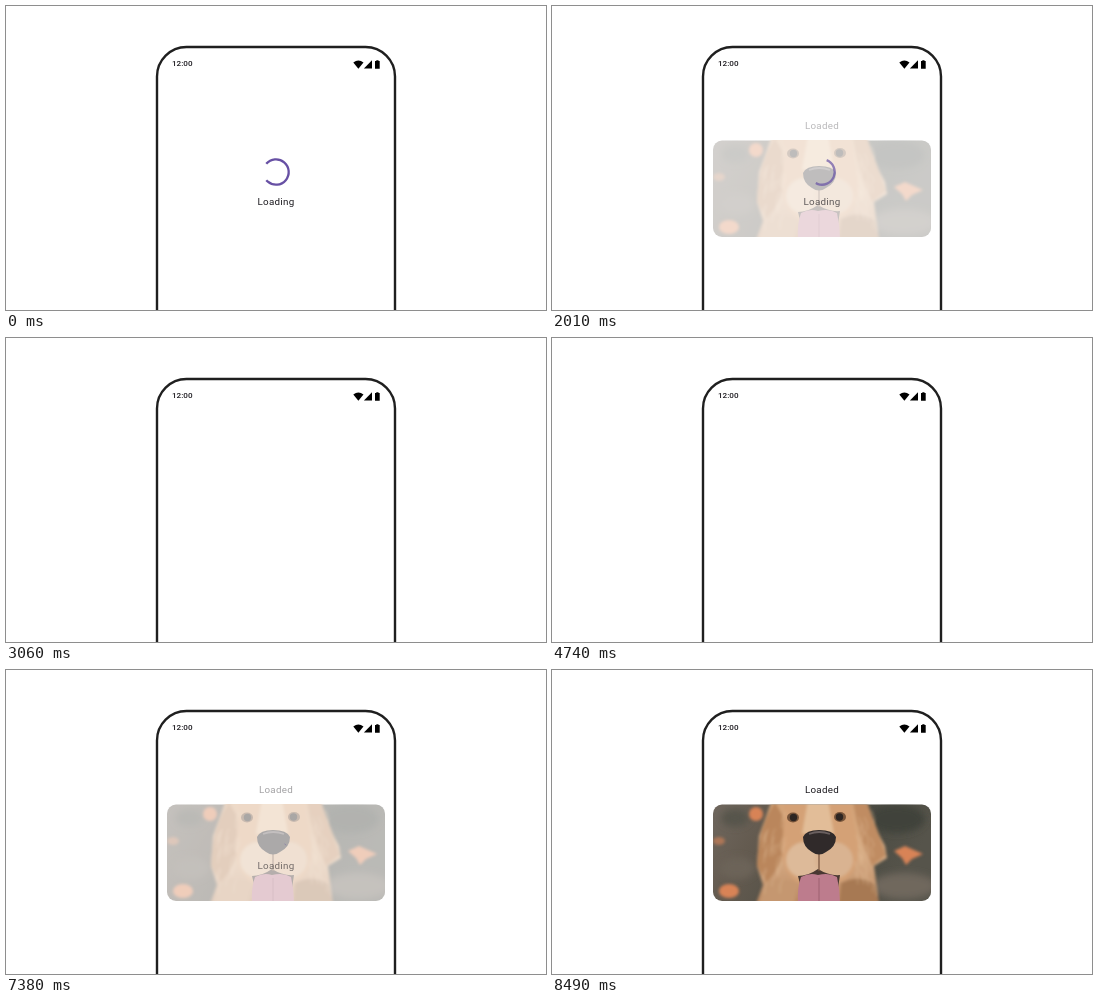
Write an HTML page that moves like this. It is 540 px wide and 304 px high and loops after 8970 ms.

```html
<!DOCTYPE html>
<html lang="en">
<head>
<meta charset="utf-8">
<title>Loading to loaded</title>
<style>
  html, body { margin: 0; width: 100%; height: 100%; overflow: hidden; background: #fff; }
  svg { display: block; width: 100vw; height: 100vh; }
  text { font-family: Roboto, "Noto Sans", sans-serif; fill: #1d1b20; }
  .label { font-size: 9.8px; letter-spacing: .3px; text-anchor: middle; }
  .clock { font-size: 8.1px; font-weight: 500; }
</style>
</head>
<body>
<svg viewBox="0 0 540 304">
  <defs>
    <clipPath id="card"><rect x="161" y="134.5" width="218" height="96.5" rx="9"/></clipPath>
    <filter id="soft" x="-20%" y="-20%" width="140%" height="140%"><feGaussianBlur stdDeviation="1.5"/></filter>
    <filter id="blur" x="-50%" y="-50%" width="200%" height="200%"><feGaussianBlur stdDeviation="3.5"/></filter>
    <filter id="fine"><feGaussianBlur stdDeviation=".6"/></filter>
    <linearGradient id="ground" x2="1" y2=".25">
      <stop offset="0" stop-color="#6f675e"/>
      <stop offset=".25" stop-color="#645b50"/>
      <stop offset=".7" stop-color="#4b4b42"/>
      <stop offset="1" stop-color="#56544b"/>
    </linearGradient>
    <linearGradient id="fur" x2="0" y2="1">
      <stop offset="0" stop-color="#d3a377"/>
      <stop offset=".55" stop-color="#d6ab84"/>
      <stop offset="1" stop-color="#b98760"/>
    </linearGradient>
  </defs>

  <path d="M151 310V70.5A29.5 29.5 0 0 1 180.5 41H359.5A29.5 29.5 0 0 1 389 70.5V310"
        fill="none" stroke="#1f1f1f" stroke-width="2.4"/>
  <text class="clock" x="166" y="60.4">12:00</text>
  <path d="M347.3 56.6Q352.4 52.6 357.5 56.6L352.4 62.7Z"/>
  <path d="M366 54.3V62.4H357.9Z"/>
  <path d="M370.3 54.2h2.2v.9h1.2v7.6h-4.7v-7.6h1.3z"/>

  <g id="loaded">
    <text class="label" x="270" y="122.6">Loaded</text>
    <g clip-path="url(#card)">
      <rect x="161" y="134" width="218" height="98" fill="url(#ground)"/>
      <g filter="url(#blur)">
        <ellipse cx="183" cy="148" rx="14" ry="9" fill="#57544b"/>
        <ellipse cx="345" cy="149" rx="28" ry="14" fill="#40433a"/>
        <ellipse cx="352" cy="216" rx="32" ry="13" fill="#6f675d"/>
        <ellipse cx="185" cy="198" rx="18" ry="11" fill="#6c6359"/>
      </g>
      <g filter="url(#soft)" fill="#d88356">
        <ellipse cx="204" cy="144" rx="7" ry="7"/>
        <ellipse cx="177" cy="221" rx="10" ry="7"/>
        <ellipse cx="167" cy="171" rx="6" ry="4" opacity=".6"/>
        <path d="M342 181L353 176L362 180L371 184L360 189L354 195L350 188Z"/>
      </g>
      <g filter="url(#soft)">
        <path d="M220 130H315Q319 151 333 176L335 188L322 196L327 234H204L211 215L205 196L207 166Z" fill="url(#fur)"/>
        <path d="M223 132Q206 157 205 196L214 212Q232 199 235 153Z" fill="#ba865c"/>
        <path d="M301 132Q306 165 320 196L334 185Q325 158 315 132Z" fill="#c08c62"/>
        <path d="M232 130H298L306 172Q308 206 286 213H247Q226 202 231 165Z" fill="#d4a176"/>
        <path d="M256 130H276L282 164H250Z" fill="#e2bd98"/>
        <ellipse cx="253" cy="190" rx="19" ry="18" fill="#ddba99"/>
        <ellipse cx="282" cy="190" rx="19" ry="18" fill="#d9b391"/>
        <path d="M214 212Q228 205 246 215L242 234H207Z" fill="#c59770"/>
        <path d="M289 213Q307 204 323 214L327 234H287Z" fill="#a77953"/>
        <path id="strands" fill="none" stroke="#e6c39d" stroke-width="1" opacity=".45"/>
      </g>
      <g filter="url(#fine)">
        <path d="M246 206Q256 206 266 199Q277 206 288 205L286 218H249Z" fill="#493832"/>
        <path d="M249 207Q258 202 266 205Q277 202 285 207Q288 220 288 233H246Q245 218 249 207Z" fill="#bd7c8d"/>
        <path d="M267 208V232" stroke="#a26676" stroke-width="1.2"/>
        <path d="M267 182V201" stroke="#79563f" stroke-width="1.3"/>
        <path d="M251 167Q254 160 267 160Q281 160 284 167Q284 177 274 182Q267 187 260 182Q251 177 251 167Z" fill="#302a2a"/>
        <path d="M257 164Q267 160 278 164" stroke="#6a6060" stroke-width="1.8" fill="none"/>
        <ellipse cx="241" cy="147.5" rx="6" ry="5" fill="#77543a"/>
        <ellipse cx="288" cy="147" rx="6" ry="5" fill="#77543a"/>
        <circle cx="241.5" cy="147.5" r="3.7" fill="#2d2522"/>
        <circle cx="287.5" cy="147" r="3.7" fill="#2d2522"/>
      </g>
    </g>
  </g>

  <g id="loading">
    <circle id="arc" cx="270" cy="166" r="12.7" pathLength="360" fill="none" stroke="#6750a4" stroke-width="2.3"/>
    <text class="label" x="270" y="198.6">Loading</text>
  </g>
  <circle id="dot" cx="210.4" cy="178.8" r="5.2" fill="#ececec" fill-opacity=".78"
          stroke="#b4b4b4" stroke-opacity=".75" stroke-width=".8"/>
</svg>
<script>
const LOOP = 8970, STEP = 30, FADE = 1620;
const CYCLE = 1422, SWEEP = 300, SPIN = 0.261;
// start, full, release, end
const TAPS = [
  [880, 1000, 1090, 1300],
  [2670, 2790, 2970, 3060],
  [4290, 4410, 4510, 4740],
  [6180, 6300, 6390, 6630]
];
const CLEAR = 2970, FIRST = 1560, ENTER = 4980, SECOND = 6870;
const $ = id => document.getElementById(id);
const loaded = $('loaded'), loading = $('loading'), arc = $('arc'), dot = $('dot');
const clamp = x => Math.min(1, Math.max(0, x));

// cubic-bezier(.4, 0, .2, 1)
function ease(x) {
  x = clamp(x);
  let lo = 0, hi = 1;
  for (let i = 0; i < 24; i++) {
    const s = (lo + hi) / 2, q = 1 - s;
    if (1.2 * q * q * s + 0.6 * q * s * s + s * s * s < x) lo = s; else hi = s;
  }
  return 3 * (1 - lo) * lo * lo + lo * lo * lo;
}

function spin(u, base) {
  const n = Math.floor(u / CYCLE), half = CYCLE / 2, p = u - n * CYCLE;
  const head = SWEEP * ease(p / half), tail = SWEEP * ease((p - half) / half);
  const sweep = Math.max(2, head - tail);
  const start = base + SPIN * u + n * SWEEP + tail - 90;
  arc.setAttribute('stroke-dasharray', `${sweep} ${360 - sweep}`);
  arc.setAttribute('transform', `rotate(${start % 360} 270 166)`);
}

function tap(t) {
  return Math.max(...TAPS.map(([a, b, c, d]) =>
    Math.min(clamp((t - a) / (b - a)), clamp((d - t) / (d - c)))));
}

function draw(t) {
  let show = 0, wait = 0;
  if (t < CLEAR) {
    show = ease((t - FIRST) / FADE);
    wait = 1 - show;
    spin(818 + Math.max(0, t - 480), 76.5);
  } else if (t >= ENTER) {
    show = ease((t - SECOND) / FADE);
    wait = t < SECOND ? ease((t - ENTER) / FADE) : 1 - show;
    // the spinner rests between the two fades
    spin(Math.min(t, 6630) + Math.max(0, t - SECOND) - 2925, -68);
  }
  loaded.style.opacity = show;
  loading.style.opacity = wait;
  dot.style.opacity = tap(t);
}

function strands() {
  let seed = 11, d = '';
  const rnd = () => (seed = seed * 16807 % 2147483647) / 2147483647;
  for (let i = 0; i < 46; i++) {
    const side = i % 2 ? 1 : -1;
    const x = 268 + side * (34 + rnd() * 20), y = 140 + rnd() * 72;
    d += `M${x.toFixed(1)} ${y.toFixed(1)}q${side * 4} 6 ${side * 3} ${(9 + rnd() * 7).toFixed(1)}`;
  }
  $('strands').setAttribute('d', d);
}

strands();
const origin = performance.now();
function frame() {
  const t = (performance.now() - origin) % LOOP;
  draw(Math.floor(t / STEP) * STEP);
  requestAnimationFrame(frame);
}
frame();
</script>
</body>
</html>
```
